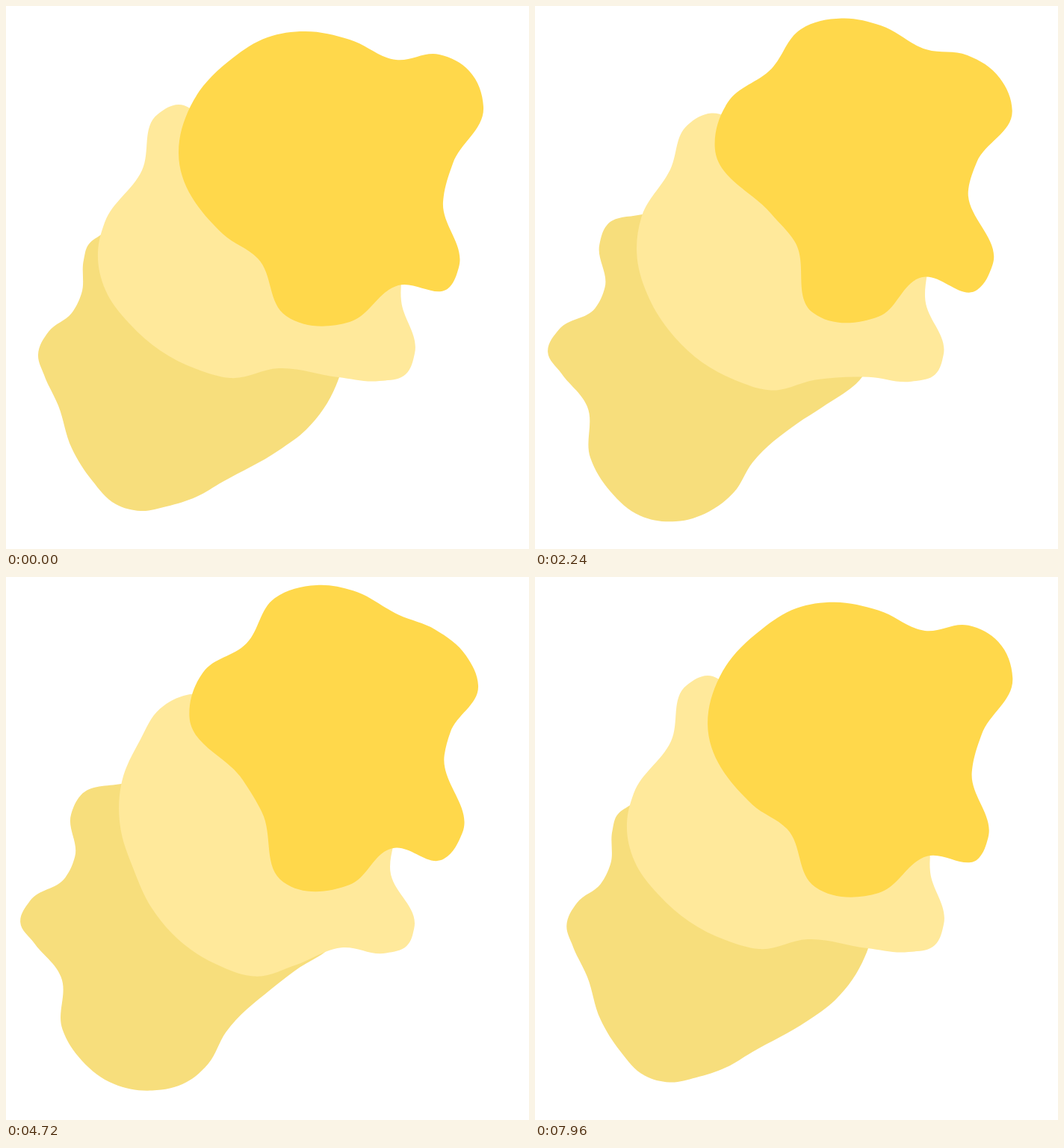
These frames come from a looping animation (700x727 px, 8000 ms). An HTML page:

```html
<!DOCTYPE html>
<html lang="en">
<head>
<meta charset="utf-8">
<title>Blobs</title>
<style>
  html, body { margin: 0; width: 100%; height: 100%; overflow: hidden; background: #fff; }
  svg { display: block; width: 100%; height: 100%; }
</style>
</head>
<body>
<svg viewBox="0 0 700 727">
  <path id="back" fill="#f7de7c"/>
  <path id="middle" fill="#ffe99b"/>
  <path id="front" fill="#ffd84b"/>
</svg>
<script>
const LOOP = 8000, STEP = 40, MORPH = 3800;

const linear = p => p;
const easeIn = p => p ** 2.1;

// Key points of each outline, clockwise, at both ends of its morph.
// swell: midway, points beyond `radius` are pushed out and nearer ones pulled in.
const blobs = [
  {
    id: 'back', ease: linear,
    swell: { cx: 260, cy: 480, radius: 183, amount: 0.35 },
    from: '446,497 402,567 365,595 290,637 255,657 215,670 180,676 147,667 115,635 88,592 70,535 ' +
      '51,494 43,467 57,436 88,411 101,385 104,340 110,320 126,307 300,300 455,460',
    to: '440,485 390,525 362,551 297,613 273,653 246,675 200,684 148,674 105,644 79,604 76,535 ' +
      '42,489 25,462 36,435 80,402 93,374 91,320 105,296 162,279 300,290 450,450'
  },
  {
    id: 'middle', ease: easeIn,
    swell: { cx: 340, cy: 340, radius: 0, amount: 0 },
    from: '260,145 530,330 529,395 547,465 535,493 500,502 445,497 365,485 300,498 260,488 ' +
      '165,425 133,380 123,330 132,290 182,220 203,145 231,132',
    to: '270,160 520,330 509,393 546,472 537,494 512,504 450,496 396,532 350,548 290,530 ' +
      '206,450 185,397 163,330 163,270 179,217 207,188 247,167'
  },
  {
    id: 'front', ease: linear,
    swell: { cx: 430, cy: 225, radius: 194, amount: 0.28 },
    from: '400,34 460,45 522,72 580,65 620,87 639,135 598,211 585,262 606,350 594,376 ' +
      '525,374 460,423 375,415 337,338 290,305 231,197 247,134 303,70 350,42',
    to: '418,10 465,16 526,48 572,73 612,110 628,148 598,207 592,235 609,340 583,375 ' +
      '518,365 460,411 371,408 337,318 312,270 247,185 266,127 323,90 362,28'
  }
];

const parsePoints = text => text.split(' ').map(pair => pair.split(',').map(Number));
for (const blob of blobs) {
  blob.path = document.getElementById(blob.id);
  blob.from = parsePoints(blob.from);
  blob.to = parsePoints(blob.to);
}

function swellPoint([x, y], { cx, cy, radius, amount }, strength) {
  const dx = x - cx, dy = y - cy;
  const scale = 1 + strength * amount * (1 - radius / Math.hypot(dx, dy));
  return [cx + dx * scale, cy + dy * scale];
}

// Direction at b of the circle through a, b and c.
function tangent([ax, ay], [bx, by], [cx, cy]) {
  const before = (bx - ax) ** 2 + (by - ay) ** 2;
  const after = (cx - bx) ** 2 + (cy - by) ** 2;
  const dx = (bx - ax) / before + (cx - bx) / after;
  const dy = (by - ay) / before + (cy - by) / after;
  const length = Math.hypot(dx, dy) || 1;
  return [dx / length, dy / length];
}

function smoothPath(points) {
  const count = points.length;
  const tangents = points.map((p, i) =>
    tangent(points[(i + count - 1) % count], p, points[(i + 1) % count]));
  const curves = points.map(([x, y], i) => {
    const next = (i + 1) % count;
    const [nx, ny] = points[next];
    const [tx, ty] = tangents[i], [ux, uy] = tangents[next];
    const reach = Math.hypot(nx - x, ny - y) * 0.35;
    return 'C' + [x + tx * reach, y + ty * reach, nx - ux * reach, ny - uy * reach, nx, ny];
  });
  return 'M' + points[0] + curves.join('') + 'Z';
}

function render(now) {
  const time = Math.floor(now % LOOP / STEP) * STEP;
  const progress = Math.min(time, LOOP - time) / MORPH;
  const strength = 4 * progress * (1 - progress);
  for (const { path, from, to, ease, swell } of blobs) {
    const mix = ease(progress);
    const points = from.map(([x, y], i) => {
      const [endX, endY] = to[i];
      return swellPoint([x + (endX - x) * mix, y + (endY - y) * mix], swell, strength);
    });
    path.setAttribute('d', smoothPath(points));
  }
}

const start = performance.now();
function tick() {
  render(performance.now() - start);
  requestAnimationFrame(tick);
}
tick();
</script>
</body>
</html>
```
